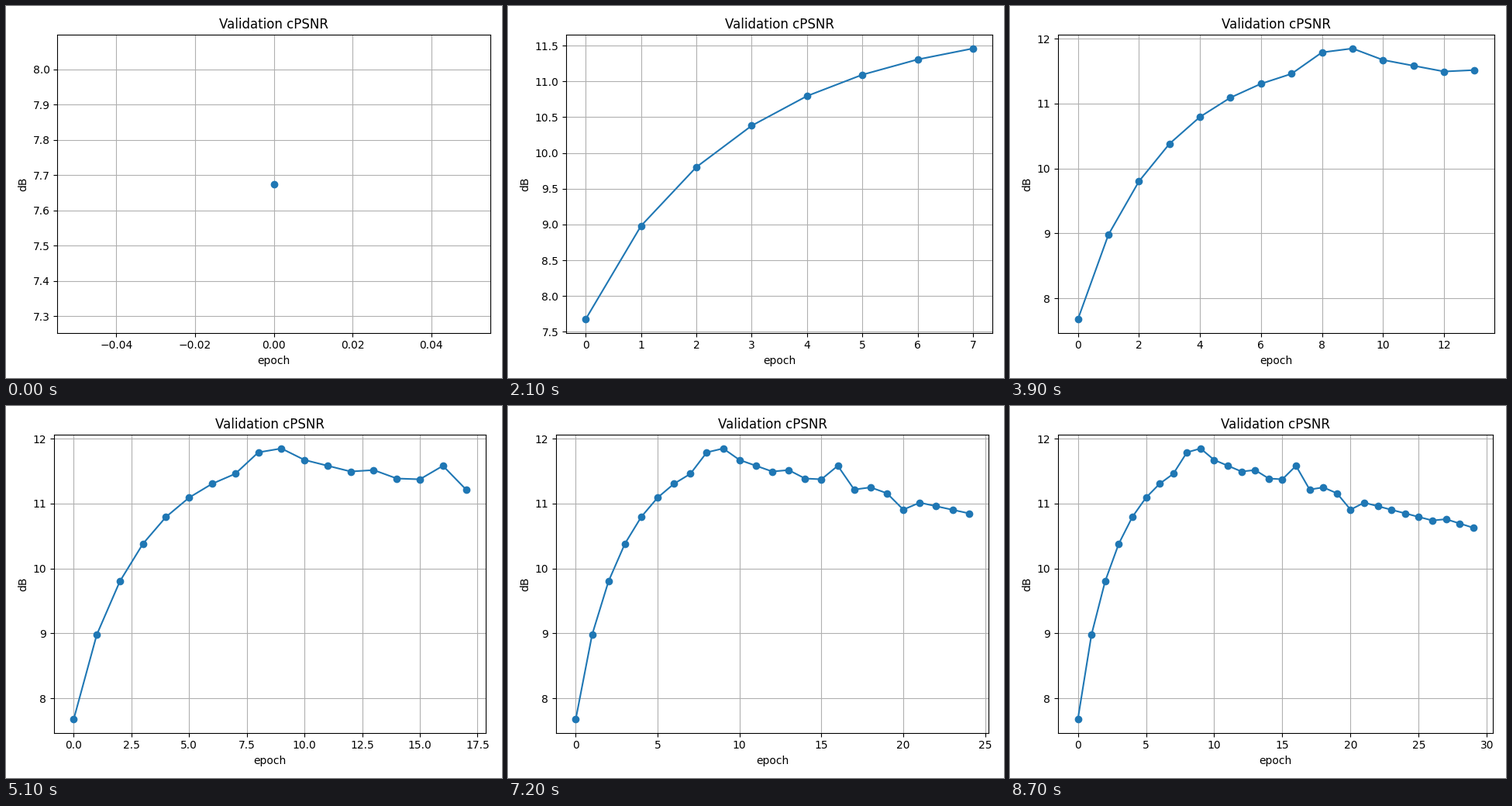
A matplotlib script that plays this animation: 640x480 px, repeating every 9000 ms.

```python
import numpy as np
import matplotlib.pyplot as plt
from matplotlib.animation import FuncAnimation

EPOCHS = 30
PEAK = 11.85
RISE_END = 8

# Turning points (epoch, dB) of the slow decline; straight in between.
TURNS = [
    (8, 11.79), (9, PEAK), (10, 11.673), (12, 11.495), (13, 11.517),
    (14, 11.387), (15, 11.375), (16, 11.583), (17, 11.217), (18, 11.25),
    (19, 11.16), (20, 10.907), (21, 11.015), (26, 10.74), (27, 10.76),
    (29, 10.628),
]


def score(epoch):
    """Saturating rise towards the peak, then the uneven decline."""
    rise = PEAK - 3.97 * 0.718 ** epoch - 0.205 * 0.1 ** epoch
    return np.where(epoch < RISE_END, rise, np.interp(epoch, *zip(*TURNS)))


epochs = np.arange(EPOCHS)
psnr = score(epochs.astype(float))

fig, ax = plt.subplots(figsize=(6.4, 4.8), dpi=100)


def draw(last):
    """Plot the scores up to this epoch, with limits and margins fitted anew."""
    ax.clear()
    fig.subplots_adjust(left=0.125, right=0.9, bottom=0.11, top=0.88)
    ax.plot(epochs[:last + 1], psnr[:last + 1], "o-", color="#1f77b4")
    ax.set_title("Validation cPSNR")
    ax.set_xlabel("epoch")
    ax.set_ylabel("dB")
    ax.grid(True)
    fig.tight_layout()
    return []


anim = FuncAnimation(fig, draw, frames=EPOCHS, interval=300,
                     init_func=lambda: draw(0), repeat=True, repeat_delay=0)
plt.show()
```
